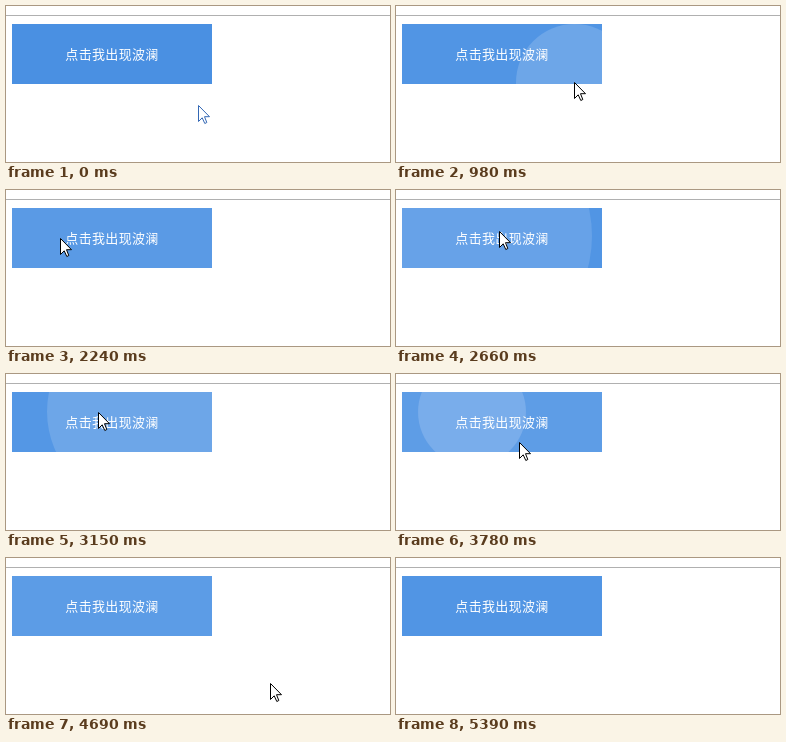
Animation of 384 by 156 pixels, one loop 5460 ms. Source, as an HTML page:

```html
<!DOCTYPE html>
<html lang="zh-CN">
<head>
<meta charset="utf-8">
<title>波澜按钮</title>
<style>
  html, body { margin: 0; width: 100%; height: 100%; overflow: hidden; background: #fff; }
  .stage { position: relative; width: 384px; height: 156px; overflow: hidden; }
  .rule { position: absolute; top: 9px; left: 0; width: 100%; height: 1px; background: #b0b0b0; }
  .button {
    position: absolute; left: 6px; top: 18px; width: 200px; height: 60px; overflow: hidden;
    color: #fff; font: 500 13px/60px "Noto Sans CJK SC", "Noto Sans CJK", sans-serif;
    letter-spacing: .33px; text-align: center;
  }
  .label { position: absolute; inset: 0; }
  .ripple { position: absolute; border-radius: 50%; background: #fff; }
  .cursor { position: absolute; left: 0; top: 0; overflow: visible; }
</style>
</head>
<body>
<div class="stage">
  <div class="rule"></div>
  <div class="button"><span class="label">点击我出现波澜</span></div>
  <svg class="cursor" width="12" height="19">
    <path d="M.5 .5V16.5L4.2 12.8L6.8 18.5L8.8 17.5L6.5 11.7H11.5Z" fill="#fff"/>
  </svg>
</div>
<script>
const LOOP = 5460, STEP = 70;
const GROWTH = 0.45, LIFE = 850, STRENGTH = 0.19;

// Pointer key points: time in ms, x, y
const path = [
  [490, 192, 99], [700, 178, 76], [1680, 178, 76], [2240, 54, 48],
  [2940, 135, 37], [3150, 92, 38], [3660, 76, 38], [3780, 123, 68],
  [4118, 149, 52], [4340, 185, 50], [4410, 185, 50], [4830, 304, 162]
];
const clicks = [850, 1613, 2380, 2940, 3250, 3660, 4118];

const button = document.querySelector('.button');
const cursor = document.querySelector('.cursor');
const arrow = cursor.firstElementChild;

function pointerAt(t) {
  const next = path.findIndex(p => p[0] > t);
  if (next < 1) return path.at(next).slice(1);
  const [t0, x0, y0] = path[next - 1], [t1, x1, y1] = path[next];
  const k = (t - t0) / (t1 - t0);
  return [x0 + (x1 - x0) * k, y0 + (y1 - y0) * k];
}

// Every click drops a ripple where the pointer is.
const ripples = clicks.map(start => {
  const el = document.createElement('div');
  el.className = 'ripple';
  button.prepend(el);
  const [x, y] = pointerAt(start);
  return { el, start, x: x - button.offsetLeft, y: y - button.offsetTop };
});

function drawRipple({ el, start, x, y }, t) {
  const age = t - start;
  const r = Math.max(0, age * GROWTH);
  el.style.left = x - r + 'px';
  el.style.top = y - r + 'px';
  el.style.width = el.style.height = 2 * r + 'px';
  el.style.opacity = age > 0 ? STRENGTH * Math.max(0, 1 - age / LIFE) : 0;
}

function draw(t) {
  button.style.background = t < clicks[0] ? '#4a90e2' : '#5195e4';
  ripples.forEach(ripple => drawRipple(ripple, t));
  const [x, y] = pointerAt(t).map(Math.round);
  cursor.style.transform = `translate(${x}px, ${y}px)`;
  arrow.setAttribute('stroke', t < path[0][0] ? '#3468b5' : '#000');
}

const begin = performance.now();
function tick() {
  const t = (performance.now() - begin) % LOOP;
  draw(Math.floor(t / STEP) * STEP);
  requestAnimationFrame(tick);
}
tick();
</script>
</body>
</html>
```
